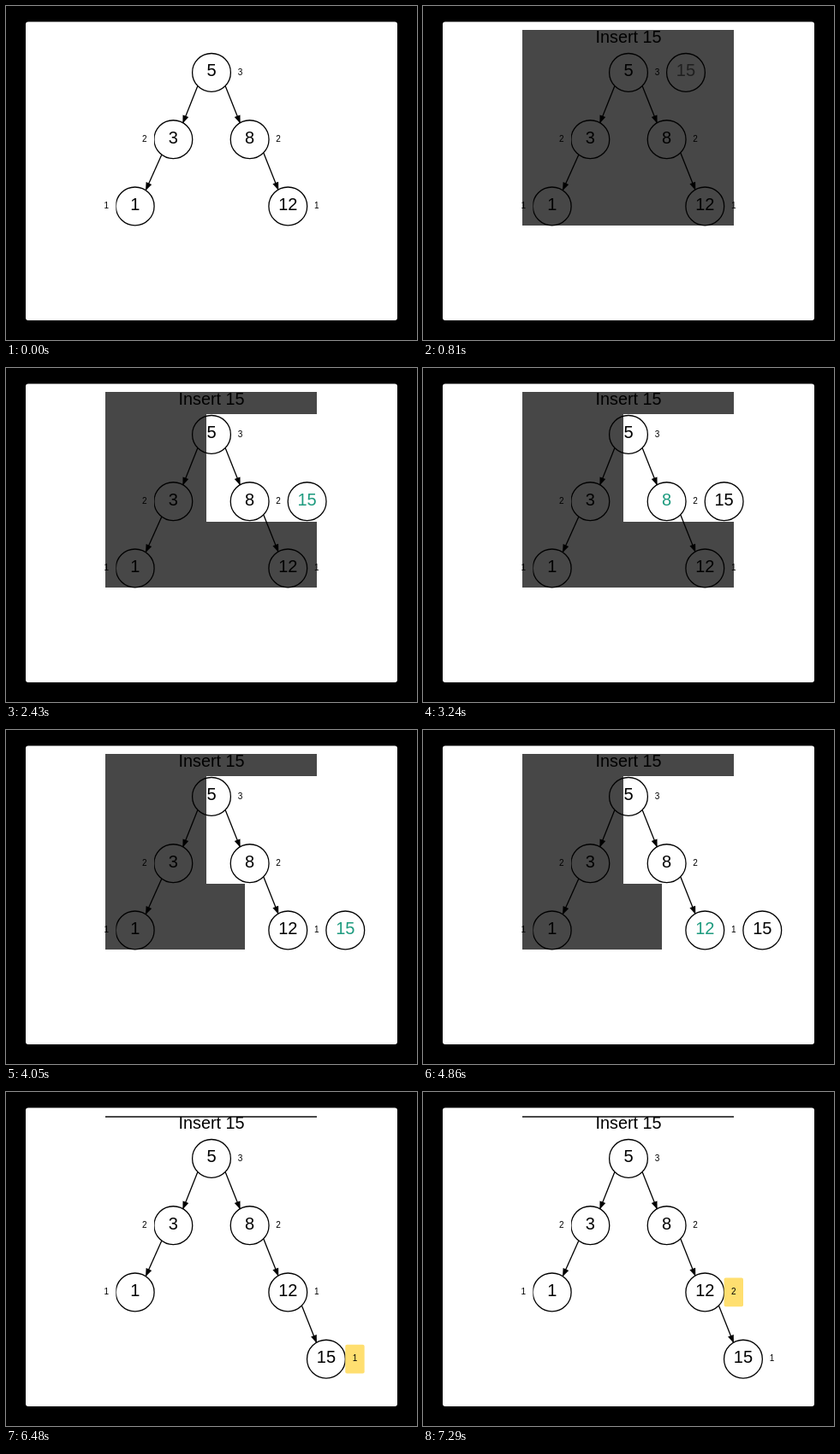
Animation, 480 px wide and 391 px high, one loop 8000 ms. Source, as an HTML page:

```html
<!DOCTYPE html>
<html lang="en">
<head>
<meta charset="utf-8">
<title>Tree insertion</title>
<style>
  html, body { margin: 0; width: 100%; height: 100%; overflow: hidden; background: #000; }
  svg { display: block; width: 480px; height: 391px; }
  text { font-family: "Liberation Sans", Arial, sans-serif; text-anchor: middle; }
</style>
</head>
<body>
<svg id="stage" viewBox="0 0 480 391"></svg>
<script>
const LOOP = 8000, STEP = 810;
const TEAL = '#1e9b7f', BLACK = '#000', GOLD = '#ffdf70';
const stage = document.getElementById('stage');

// Tree grid: columns are half a node apart, rows one level apart.
const colX = c => 240 + c * 44.65;
const rowY = r => 77.9 + r * 78.25;

function add(tag, attrs, parent = stage) {
  const el = document.createElementNS('http://www.w3.org/2000/svg', tag);
  for (const key in attrs) el.setAttribute(key, attrs[key]);
  parent.appendChild(el);
  return el;
}

function write(str, x, y, size, parent = stage) {
  const el = add('text', { x, y, 'font-size': size }, parent);
  el.textContent = str;
  return el;
}

function show(el, on) {
  el.setAttribute('visibility', on ? 'visible' : 'hidden');
}

function node(value, col, row) {
  const g = add('g', { transform: `translate(${colX(col)} ${rowY(row)})` });
  add('circle', { r: 22.4, fill: '#fff', stroke: BLACK, 'stroke-width': 1.3 }, g);
  return { g, text: write(value, 0, 4.4, 20, g) };
}

// Height label beside a node; side is -1 for left, 1 for right.
function label(value, col, row, side) {
  const g = add('g', { transform: `translate(${colX(col) + side * 33.5} ${rowY(row)})` });
  const box = add('rect', { x: -11.2, y: -16.8, width: 22.4, height: 33.6, rx: 2 }, g);
  box.setAttribute('fill', side < 0 ? '#fff' : 'none');
  return { g, box, text: write(value, 0, 2.6, 10, g) };
}

function arrow(col, row, side, from = [16.2, 15.8], to = [11.2, 19]) {
  const x1 = colX(col) + side * from[0], y1 = rowY(row) + from[1];
  const x2 = colX(col + side) - side * to[0], y2 = rowY(row + 1) - to[1];
  const g = add('g', {});
  const angle = Math.atan2(y2 - y1, x2 - x1) * 180 / Math.PI;
  add('line', { x1, y1, x2, y2, stroke: BLACK, 'stroke-width': 1.3 }, g);
  add('path', { d: 'M0.5 0L-9 -3.6V3.6Z', transform: `translate(${x2} ${y2}) rotate(${angle})` }, g);
  return g;
}

const box = (x1, y1, x2, y2) => `M${x1} ${y1}H${x2}V${y2}H${x1}Z`;

add('rect', { x: 23, y: 18.5, width: 434, height: 349.5, rx: 3, fill: '#fff' });
const title = write('Insert 15', 240, 43.4, 19.8);

arrow(0, 0, -1);
arrow(0, 0, 1);
arrow(-1, 1, -1, [13.6, 18.2], [12.5, 18.7]);
arrow(1, 1, 1);
const newArrow = arrow(2, 2, 1);

const five = node(5, 0, 0);
const three = node(3, -1, 1);
const eight = node(8, 1, 1);
const one = node(1, -2, 2);
const twelve = node(12, 2, 2);
const fresh = node(15, 1.5, 0);

label(3, 0, 0, 1);
label(2, -1, 1, -1);
label(2, 1, 1, 1);
label(1, -2, 2, -1);
const twelveLabel = label(1, 2, 2, 1);
const freshLabel = label(1, 3, 3, 1);

const shade = add('path', { fill: BLACK, 'fill-opacity': 0.72, 'fill-rule': 'evenodd' });

const FULL = box(116, 28, 363, 257);
const TOP_OPEN = FULL + box(234, 54, 363, 180);
const RIGHT_OPEN = box(116, 28, 363, 54) + box(116, 54, 234, 180) + box(116, 180, 279, 257);
const RULE = box(116, 28, 363, 30);
const shades = ['', FULL, FULL + box(234, 68, 318, 83), TOP_OPEN, TOP_OPEN,
  RIGHT_OPEN, RIGHT_OPEN, RULE, RULE, RULE];

function draw(ms) {
  const step = Math.min(9, Math.floor((ms % LOOP) / STEP));
  const level = Math.max(0, Math.floor((step - 1) / 2));
  const placed = step >= 7;

  show(title, step > 0);
  show(fresh.g, step > 0);
  show(newArrow, placed);
  shade.setAttribute('d', shades[step]);

  const col = placed ? 3 : 1.5 + level;
  fresh.g.setAttribute('transform', `translate(${colX(col)} ${rowY(placed ? 3 : level)})`);
  const active = !placed && step % 2 === 1;
  fresh.text.setAttribute('fill', active ? (step === 1 ? '#707070' : TEAL) : BLACK);
  [five, eight, twelve].forEach((n, i) =>
    n.text.setAttribute('fill', step === 2 + 2 * i ? TEAL : BLACK));

  show(freshLabel.g, step >= 8);
  freshLabel.box.setAttribute('fill', step === 8 ? GOLD : 'none');
  twelveLabel.box.setAttribute('fill', step === 9 ? GOLD : 'none');
  twelveLabel.text.textContent = step === 9 ? 2 : 1;
}

const start = performance.now();
function tick() {
  draw(performance.now() - start);
  requestAnimationFrame(tick);
}
draw(0);
tick();
</script>
</body>
</html>
```
